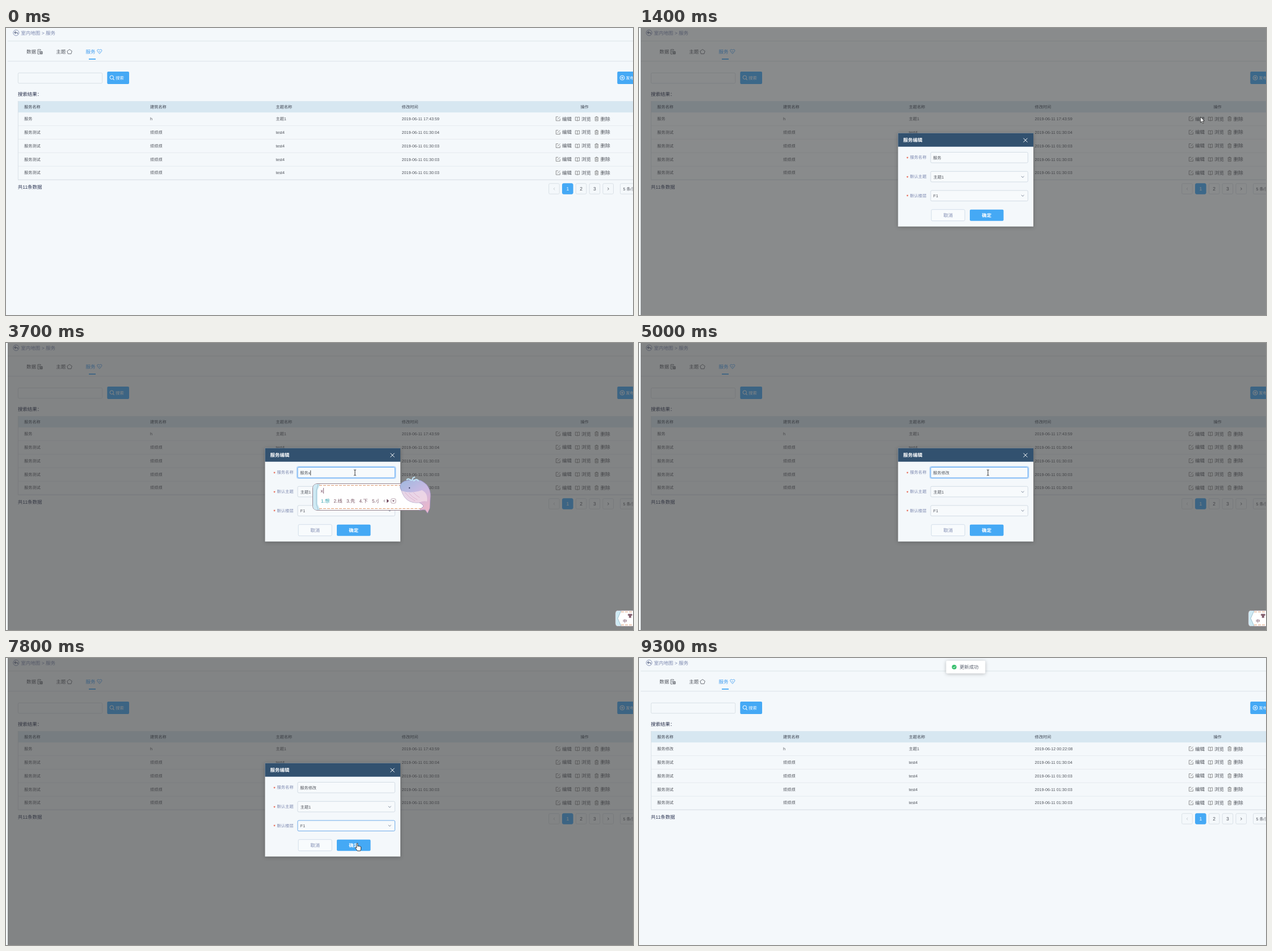
These frames come from a looping animation (1105x507 px, 9.4 s). An HTML page:

```html
<!DOCTYPE html>
<html lang="zh-CN">
<head>
<meta charset="utf-8">
<title>服务编辑</title>
<style>
html, body { margin: 0; width: 100%; height: 100%; overflow: hidden; background: #f4f8fb; }
svg { display: block; width: 100%; height: 100%; }
text {
  font-family: "Liberation Sans", "Noto Sans CJK SC", "Noto Sans CJK", sans-serif;
  text-rendering: geometricPrecision;
  white-space: pre;
}
.shadow { filter: drop-shadow(0 1px 3px rgba(0, 0, 0, .25)); }
</style>
</head>
<body>
<svg id="stage" viewBox="0 0 1105 507" xmlns="http://www.w3.org/2000/svg"></svg>
<script>
const LOOP = 9400, STEP = 100;
const BG = '#f4f8fb', BLUE = '#45a9f5', LINE = '#d9e0e6', INK = '#50545c', SLATE = '#7d89b0';

// Markup helpers; text is placed by the middle of its line.
const text = (x, y, str, size = 7.2, fill = INK, more = '') =>
  `<text x="${x}" y="${y + size * .37}" font-size="${size}" fill="${fill}" ${more}>${str}</text>`;
const mid = (x, y, str, size, fill, more = '') =>
  text(x, y, str, size, fill, 'text-anchor="middle" ' + more);
const rect = (x, y, w, h, fill, more = '') =>
  `<rect x="${x}" y="${y}" width="${w}" height="${h}" fill="${fill}" ${more}/>`;
const box = (x, y, w, h, fill, stroke, more = '') =>
  rect(x, y, w, h, fill, `rx="2" stroke="${stroke}" ${more}`);
const line = (d, stroke, width = .9, more = '') =>
  `<path d="${d}" fill="none" stroke="${stroke}" stroke-width="${width}" ${more}/>`;
const circle = (x, y, r, fill, more = '') =>
  `<circle cx="${x}" cy="${y}" r="${r}" fill="${fill}" ${more}/>`;
const group = (id, body, more = '') => `<g id="${id}" ${more}>${body}</g>`;
const at = (x, y, body) => `<g transform="translate(${x} ${y})">${body}</g>`;

const rowY = i => 160.4 + i * 23.85;

function header() {
  const data = line('M1 1h5v2M1 1v8h3M2.5 3.5h2M2.5 5.5h1.5M5 4.5h4v4.5h-4zM5 6h4M5 7.5h4', INK, .8);
  const pentagon = line('M5 .8 9.2 3.8 7.8 8.6H2.2L.8 3.8z', INK, .8, 'stroke-linejoin="round"');
  const heart = line('M4.5 8.5.8 4.2Q-.1 2.6 1 1.3 2.8.2 4.5 2 6.2.2 8 1.3 9.1 2.6 8.2 4.2zM3 4l1.5 1.5L6 4', '#3f9cf0', .8);
  return circle(17.8, 8.5, 5, 'none', `stroke="${SLATE}" stroke-width=".9"`) +
    line('M17.3 5.8 15 8.1l2.3 2.2M15.2 8.1h3.8q1.8.2 1.6 2.7', '#66718f', 1.1) +
    text(26.3, 8.5, '室内地图 &gt; 服务', 8.5, SLATE) +
    line('M3 23h1102M3 58.7h1102', LINE) +
    text(36, 42, '数据', 8.5) + at(55, 37, data) +
    text(88.3, 42, '主题', 8.5) + at(107, 37, pentagon) +
    text(140.5, 42, '服务', 8.5, '#3f9cf0') + at(160.3, 37, heart) +
    rect(146, 54, 12, 1.8, BLUE);
}

function searchBar() {
  return box(21.3, 79.3, 148.4, 18.4, BG, LINE) +
    rect(178.3, 77, 38.7, 22, BLUE, 'rx="2"') +
    circle(186.3, 87.2, 3.2, 'none', 'stroke="#fff"') + line('M188.6 89.6l2.1 2.2', '#fff', 1.1) +
    text(193.3, 88.5, '搜索', 7.3, '#fff', 'font-weight="500"') +
    rect(1077.3, 77, 50, 22, BLUE, 'rx="2"') +
    circle(1086, 88, 3.9, 'none', 'stroke="#fff"') + line('M1084 88h4M1086 86v4', '#fff', 1) +
    text(1092.2, 88.5, '发布服务', 7.3, '#fff', 'font-weight="500"') +
    text(20.8, 117, '搜索结果：', 8.5, '#28304c');
}

function actions(y) {
  const edit = line('M4.5.9H.7v7h7V4.2M3.2 5.5 7.8.8', '#777', .8);
  const book = line('M4 1.6Q2.2.6.4 1v6q1.8-.3 3.6.6 1.8-.9 3.6-.6V1Q5.8.6 4 1.6v6', '#777', .8);
  const bin = line('M.3 2h6.6M2.4 1.8V.6h2.4v1.2M1.1 2.2v5.9h5V2.2M2.8 3.7v3M4.4 3.7v3', '#777', .8);
  return at(968.7, y - 4.5, edit) + text(980, y, '编辑', 8.5) +
    at(1003, y - 4, book) + text(1014, y, '浏览', 8.5) +
    at(1037.2, y - 4.5, bin) + text(1047.8, y, '删除', 8.5);
}

function table() {
  const cols = [32, 254, 475.5, 697.5];
  let out = rect(21, 129.2, 1084, 20, '#d7e7f1');
  ['服务名称', '建筑名称', '主题名称', '修改时间'].forEach((s, i) => {
    out += text(cols[i], 139.4, s, 7.2, '#3d4350', 'font-weight="500"');
  });
  out += text(1012.4, 139.4, '操作', 7.2, '#3d4350', 'font-weight="500"');
  out += rect(22, 149.2, 1083, 23, '#ebf7ff', 'id="hover"');
  for (let i = 0; i < 5; i++) {
    const y = rowY(i), time = '2019-06-11 01:30:0' + (i == 1 ? 4 : 3);
    out += line(`M21 ${y + 12.2}H1105`, '#e1e7ec', .8) + actions(y);
    if (i) ['服务测试', '烦烦烦', 'test4', time].forEach((s, c) => out += text(cols[c], y, s));
    else out += group('before', text(32, y, '服务') + text(697.5, y, '2019-06-11 17:43:59')) +
      group('after', text(32, y, '服务修改') + text(697.5, y, '2019-06-12 00:22:08')) +
      text(254, y, 'h') + text(475.5, y, '主题1');
  }
  return out + line('M21.4 129v139', LINE) + line('M21 268.2h1084', LINE);
}

function pager() {
  let out = text(20.8, 280.5, '共11条数据', 8.5, '#2f3856');
  for (let i = 0; i < 5; i++) {
    const x = 956.7 + i * 23.8, on = i == 1;
    out += box(x, 274.8, 18.6, 18.4, on ? BLUE : BG, on ? BLUE : LINE);
    if (i % 4) out += mid(x + 9.3, 284, i, 8.5, on ? '#fff' : INK);
  }
  return out + line('M967.2 282l-2 2.2 2 2.2', '#c0c6cc') + line('M1060.3 282l2 2.2-2 2.2', INK) +
    box(1082.5, 274.8, 50, 18.4, BG, LINE) + text(1087.5, 284, '5 条/页');
}

function modal() {
  const field = (y, label, id) =>
    text(471.5, y + 1, '*', 8, '#e5533d', 'font-weight="bold"') + text(477.5, y - .5, label, 7.3, SLATE) +
    box(514, y - 9.5, 171.4, 18.6, '#f7fafc', '#d3dce5', `id="${id}"`);
  const chevron = y => line(`M673.8 ${y - 1}l2.4 2.3 2.4-2.3`, '#6f7a90');
  return rect(456.5, 185.7, 238.5, 165, BG, 'class="shadow"') +
    rect(456.5, 185.7, 238.5, 24, '#32516f') +
    text(465.5, 197.7, '服务编辑', 8.5, '#fff', 'font-weight="bold"') +
    line('M677.5 194.7l7 7M684.5 194.7l-7 7', '#fff', 1) +
    rect(512.7, 218.3, 174, 21, 'none', 'id="glow" rx="3" stroke="#2d8cf0" stroke-opacity=".3" stroke-width="1.6"') +
    field(229, '服务名称', 'name') + field(262.8, '默认主题', 'theme') + field(296.5, '默认楼层', 'floor') +
    text(518.3, 229.3, '服务', 7.2, INK, 'id="value"') +
    line('M0 225v9', '#333', .9, 'id="caret"') +
    text(518.8, 263, '主题1') + chevron(262.8) + text(518.8, 296.5, 'F1') + chevron(296) +
    box(515.2, 320.7, 59, 20, '#f8fbfd', '#d3deea') + mid(544.8, 330.7, '取消', 8.4, SLATE) +
    rect(583, 320.7, 59.5, 20, BLUE, 'rx="2"') +
    mid(612.7, 330.7, '确定', 8.4, '#fff', 'font-weight="bold"') +
    group('menu', rect(514, 309, 171.5, 25, '#fff', 'rx="2" class="shadow"') +
      rect(514, 312, 171.5, 19, '#f0f6fb') + text(519, 321.5, 'F1', 7.2, BLUE));
}

function whale() {
  return `<path d="M697 261q-7-11 5-17 24-8 37 4 11 10 9 26l-1 18 -4 9-5-7-10 2 8-8q-5-6-8-6-24 2-31-21z" fill="url(#skin)" stroke="#8d83b5" stroke-width=".7"/>
    <path d="M697 261q15 6 36-1 11 5 9 20-6-2-14 2-24 2-31-21z" fill="#f4dfe9" opacity=".75"/>` +
    line('M703 264q7 9 18 15M710 265q6 8 15 12M718 264q5 6 11 9', '#d8abc8', .8) +
    line('M715 243q-6-5-9-1M716 243q0-6 5-6M718 244q6-6 9 0', '#bfe3f4', 2.2) +
    circle(711, 256, 1.2, '#43486e');
}

function inputMethod() {
  return group('popup', `<path id="panel" fill="#fff" stroke="#8c7884" stroke-width=".9"/>` +
    `<path d="M547 249h7l-5 11v24l5 11h-7q-6-1-6-8v-30q0-7 6-8z" fill="#cfeaf4"/>` +
    line('M550 250l-3 11v24l3 9', '#94b9c9', .8) +
    line('', '#dc9a70', 1, 'id="stitch" stroke-dasharray="5 2"') +
    text(554.5, 261, '', 8.2, '#6b3f58', 'id="pinyin"') + line('M0 256v10', '#6b3f58', .8, 'id="mark"') +
    '<g id="words" clip-path="url(#cut)"></g>' +
    group('deco', '<path d="M668 276v6l-3.5-3z" fill="#c9c2c9"/><path d="M671 275.5v7l4-3.5z" fill="#70485e"/>' +
      box(678.5, 275.2, 8.4, 7.8, '#fff', '#a58a99', 'stroke-width=".8"') +
      '<path d="M680.6 278h4.2l-2.1 2.5z" fill="#70485e"/>' + whale())) +
    group('badge', '<path d="M1079 472.5h30V500.5h-30q-5 0-5-5v-18q0-5 5-5z" fill="#fff" stroke="#9a9097"/>' +
      '<path d="M1079 473h5l-6 13.5 6 13.5h-5q-4.500-.5-4.500-5v-17q0-4.500 4.500-5z" fill="#cfeaf4"/>' +
      line('M1084 473l-6 13.500 6 13.500', '#8eb5c6', .8) +
      line('M1084 475h21M1084 498h21', '#dc9a70', 1, 'stroke-dasharray="5 2"') +
      text(1087, 491, '中', 7.6, '#70485e') +
      '<path d="M1095.500 480l2.500-2 1.800 1 1.800-1 2.500 2-1.300 2-1 -.5v4h-4v-4l-1 .5z" fill="#84606f"/>');
}

function toast() {
  return rect(541.3, 6.7, 69, 22.500, '#fff', 'rx="2" class="shadow"') +
    circle(555.5, 18, 4.1, '#35be6b') + line('M553.500 18l1.500 1.600 2.700-3', '#fff', 1) +
    text(565, 18, '更新成功', 8.4, '#59606e');
}

const pointers =
  '<path id="arrow" d="M0 0V10l2.300-2.200 1.700 3.800 1.600-.7-1.700-3.700H7z" fill="#fff" stroke="#222" stroke-width=".8"/>' +
  '<path id="hand" d="M-1 8.500V1.100a1 1 0 0 1 2 0V5.500l.9-.5 1 .6.9-.3 1 .7 1-.1.8.9V10q0 2.200-1.200 3.800H.3Q-1 11.500-3.300 8.700q-.4-1.400.9-1.400z" fill="#fff" stroke="#222" stroke-width=".9" stroke-linejoin="round"/>' +
  line('M-2-5q2 0 2 1 0-1 2-1M0-4V4M-2 5q2 0 2-1 0 1 2 1', '#222', .9, 'id="beam"');

const stage = document.getElementById('stage');
stage.innerHTML = `<defs>
  <linearGradient id="skin" x2=".6" y2="1"><stop stop-color="#9db9df"/><stop offset=".55" stop-color="#c9b9e3"/><stop offset="1" stop-color="#e9b7cc"/></linearGradient>
  <clipPath id="cut"><rect id="cutBox" x="550" y="268" width="107" height="22"/></clipPath></defs>` +
  rect(0, 0, 1105, 507, BG) + header() + searchBar() + table() + pager() +
  rect(3, 0, 1102, 507, '#373737', 'id="mask"') +
  group('modal', modal()) + inputMethod() + group('toast', toast()) + group('cursor', pointers);

const el = {};
stage.querySelectorAll('[id]').forEach(n => el[n.id] = n);
const set = (id, name, value) => el[id].setAttribute(name, value);
const show = (id, on) => set(id, 'display', on ? 'inline' : 'none');
const clamp = v => Math.max(0, Math.min(1, v));
const span = (t, a, b) => clamp((t - a) / (b - a));
const within = (t, a, b) => t >= a && t < b;

// Pointer stops: time, x, y.
const stops = [
  [100, 1108, 54], [600, 989.500, 157], [1500, 989.500, 157], [2100, 615, 229],
  [5000, 615, 229], [5600, 581, 289], [6100, 581, 289], [6500, 590, 317],
  [7100, 590, 317], [7500, 619, 327], [8300, 619, 327], [8700, 1112, 88]
];
// Typing stages: start, letters, right edge of the panel, candidates.
const typing = [
  [3700, 'x', 749, '想 线 先 下 小'],
  [3800, 'xi', 749, '系 洗 西 细 喜'],
  [3900, 'xiu', 749, '修 秀 休 绣 袖'],
  [4000, "xiu'g", 798, '修改 修个 修过 秀 休'],
  [4200, "xiu'gai", 802, '修改 修 秀 休 绣 袖']
];

function moveCursor(t) {
  show('cursor', within(t, 200, 8700));
  const i = Math.max(1, stops.findIndex(s => s[0] > t));
  const [a, x0, y0] = stops[i - 1], [b, x1, y1] = stops[i];
  const p = span(t, a, b), e = p * p * (3 - 2 * p);
  set('cursor', 'transform', `translate(${x0 + (x1 - x0) * e} ${y0 + (y1 - y0) * e})`);
  const beam = within(t, 2000, 5200);
  const hand = within(t, 600, 1200) || within(t, 5500, 8100);
  show('beam', beam);
  show('hand', hand);
  show('arrow', !beam && !hand);
}

function drawPanel(t) {
  const now = within(t, 3700, 4500) && typing.filter(s => s[0] <= t).pop();
  show('popup', now);
  show('badge', within(t, 2400, 5800));
  const letters = now ? now[1].replace("'", '') : '';
  el.value.textContent = '服务' + (t >= 4500 ? '修改' : letters);
  set('caret', 'transform', `translate(${518.800 + el.value.getComputedTextLength()} 0)`);
  show('caret', within(t, 2300, 2700) || within(t, 3200, 5000) || within(t, 5500, 5800));
  if (!now) return;
  const [, pinyin, right, words] = now, dx = right - 749, end = 738 + dx;
  set('panel', 'd', `M548 248.500H${end}q5 0 5 6V290q0 5.500-5 5.500H548q-7.500-1-7.500-8V257q0-7.500 7.500-8.500z`);
  set('stitch', 'd', `M552 251.500H${end}M552 292.500H${end}`);
  set('deco', 'transform', `translate(${dx} 0)`);
  set('cutBox', 'width', 107 + dx);
  el.pinyin.textContent = pinyin;
  set('mark', 'transform', `translate(${555.500 + el.pinyin.getComputedTextLength()} 0)`);
  let x = 555, out = '';
  words.split(' ').forEach((w, i) => {
    out += text(x, 279, `${i + 1}.${w}`, 8.3, i ? '#75505f' : '#2c9fac');
    x += (w.length + .83) * 8.3 + 7.3;
  });
  el.words.innerHTML = out;
}

function drawModal(t) {
  const enter = span(t, 1130, 1400), leave = span(t, 7820, 8120);
  set('mask', 'opacity', .6 * span(t, 1120, 1420) * (1 - leave));
  show('modal', t >= 1200 && leave < 1);
  set('modal', 'opacity', enter * (1 - leave) ** 2);
  const s = (.85 + .15 * enter) * (1 - .155 * leave);
  set('modal', 'transform', `translate(575.750 268.200) scale(${s}) translate(-575.750 -268.200)`);
  const focus = within(t, 2300, 5800);
  show('glow', focus);
  set('name', 'stroke', focus ? '#57a3f3' : '#d3dce5');
  set('floor', 'stroke', t >= 5800 ? '#6daaea' : '#d3dce5');
  show('menu', within(t, 5800, 7000));
}

function drawToast(t) {
  const e = span(t, 7850, 8200), out = Math.max(0, (t - 9150) / 150);
  show('toast', t >= 7900);
  set('toast', 'opacity', Math.min(1, e * 2.2));
  set('toast', 'transform', `translate(0 ${-22 * (1 - e) ** 2 - 2 * out * out})`);
}

function draw(t) {
  const saved = t >= 7900;
  show('before', !saved);
  show('after', saved);
  show('hover', within(t, 500, 1200));
  drawModal(t);
  drawPanel(t);
  drawToast(t);
  moveCursor(t);
}

function tick() {
  draw(Math.floor(performance.now() % LOOP / STEP) * STEP);
  requestAnimationFrame(tick);
}
tick();
</script>
</body>
</html>
```
